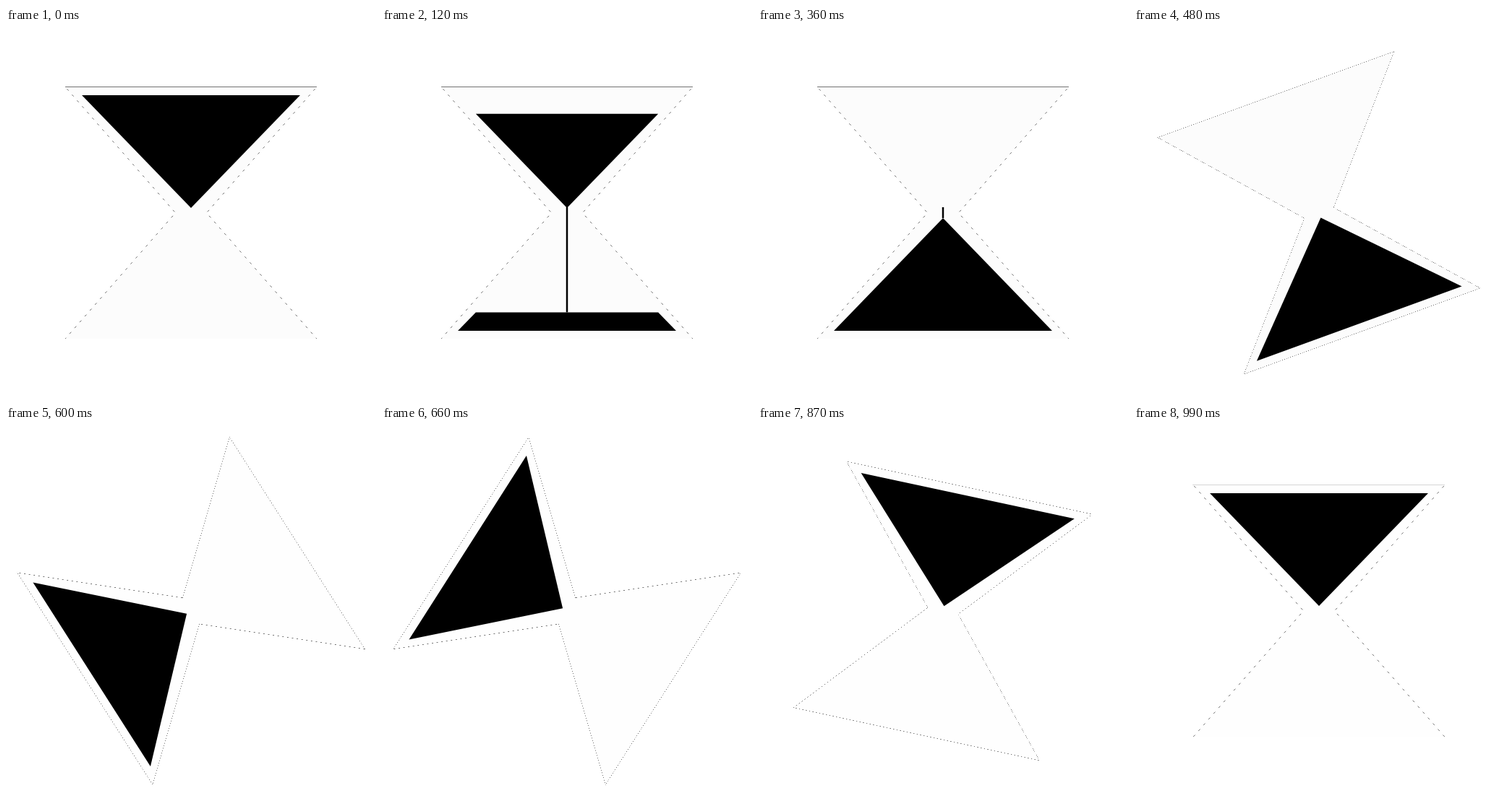
These frames come from a looping animation (512x512 px, 1020 ms). An HTML page with a canvas:

```html
<!DOCTYPE html>
<html lang="en">
<head>
<meta charset="utf-8">
<title>Hourglass</title>
<style>
  html, body { margin: 0; width: 100%; height: 100%; overflow: hidden; background: #fff; }
  canvas { display: block; width: 100vw; height: 100vh; }
</style>
</head>
<body>
<canvas id="stage" width="512" height="512"></canvas>
<script>
const ctx = document.getElementById('stage').getContext('2d');
const LOOP = 1020, STEP = 30, C = 256;

// Glass and sand sizes, measured from their pivots
const GLASS = { pivot: 255.84, w: 174, top: -174.34, bottom: 174.16, neck: 21.5 };
const SAND = { w: 151, far: 163, tip: 7 };
const TRAVEL = 164;

const ease = u => u * u * (3 - 2 * u);

function tween(t, t0, t1, from, to) {
  const u = Math.min(1, Math.max(0, (t - t0) / (t1 - t0)));
  return from + (to - from) * ease(u);
}

// Lean back, swing past half a turn, settle
function angleAt(t) {
  if (t < 480) return tween(t, 390, 480, 0, -20);
  if (t < 780) return tween(t, 480, 780, -20, 200);
  return tween(t, 780, 990, 200, 180);
}

function turn(points, deg, cy = C) {
  const a = deg * Math.PI / 180, c = Math.cos(a), s = Math.sin(a);
  return points.map(([x, y]) => [C + x * c - y * s, cy + x * s + y * c]);
}

function fillShape(points, color) {
  ctx.fillStyle = color;
  ctx.beginPath();
  points.forEach(([x, y]) => ctx.lineTo(x, y));
  ctx.fill();
}

// Hairline that shows only where it runs close to pixel centres
function hairline([x0, y0], [x1, y1]) {
  const steep = Math.abs(y1 - y0) > Math.abs(x1 - x0);
  let [a0, b0, a1, b1] = steep ? [y0, x0, y1, x1] : [x0, y0, x1, y1];
  if (a0 > a1) [a0, b0, a1, b1] = [a1, b1, a0, b0];
  const slope = (b1 - b0) / (a1 - a0);
  for (let a = Math.floor(a0); a < a1; a++) {
    const b = b0 + slope * (a + 0.5 - a0);
    const row = Math.floor(b);
    const alpha = Math.min(0.55, (0.22 - Math.abs(b - row - 0.5)) * 4);
    if (alpha <= 0) continue;
    ctx.fillStyle = `rgba(0,0,0,${alpha})`;
    if (steep) ctx.fillRect(row, a, 1, 1);
    else ctx.fillRect(a, row, 1, 1);
  }
}

function drawGlass(t, deg) {
  const { pivot, w, top, bottom, neck } = GLASS;
  const points = turn([
    [-w, top], [w, top], [neck, 0], [w, bottom], [-w, bottom], [-neck, 0]
  ], deg, pivot);
  fillShape(points, t < 600 ? '#fcfcfc' : '#fefefe');
  points.forEach((p, i) => hairline(p, points[(i + 1) % points.length]));
}

function drawSand(t, deg) {
  const { w, far, tip } = SAND;
  const moved = tween(t, 30, 390, 0, TRAVEL);
  const level = Math.max(tip, far - moved);
  const half = w * (level - tip) / (far - tip);

  if (level > tip) {
    fillShape(turn([[-half, -level], [half, -level], [0, -tip]], deg), '#000');
  }
  if (moved > 0) {
    fillShape(turn([[-w, far], [w, far], [half, level], [-half, level]], deg), '#000');
  }
  if (t > 30 && t < 390) {
    ctx.fillStyle = '#000';
    ctx.fillRect(C - 1.25, C - tip - 1, 2.5, level + tip + 1);
  }
}

function draw(t) {
  const deg = angleAt(t);
  ctx.fillStyle = '#fff';
  ctx.fillRect(0, 0, 512, 512);
  drawGlass(t, deg);
  drawSand(t, deg);
}

const start = performance.now();
function tick() {
  const t = (performance.now() - start) % LOOP;
  draw(Math.floor(t / STEP) * STEP);
  requestAnimationFrame(tick);
}
tick();
</script>
</body>
</html>
```
